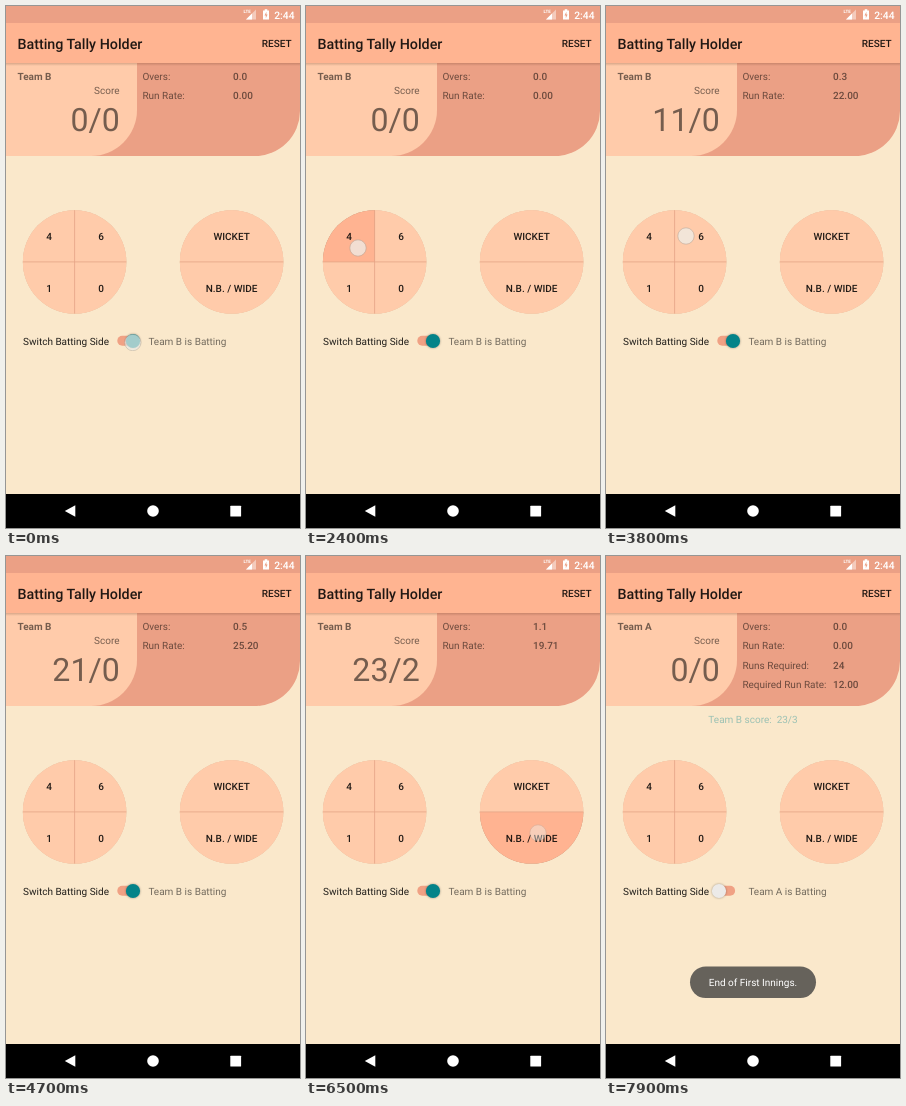
An HTML page that plays this animation: 294 px wide and 522 px high, repeating every 8000 ms.

```html
<!DOCTYPE html>
<html lang="en">
<head>
<meta charset="utf-8">
<title>Batting Tally Holder</title>
<style>
  html, body { margin: 0; width: 100%; height: 100%; overflow: hidden; background: #fae8cb; }
  svg { display: block; width: 294px; height: 522px; }
  text { font: 400 10px Roboto, sans-serif; fill: #000; fill-opacity: .54; text-rendering: geometricPrecision; }
  .medium { font-weight: 500; }
  .bold { font-weight: 700; }
  .dark { fill-opacity: .87; }
  .white { fill: #fff; fill-opacity: 1; }
  .end { text-anchor: end; }
  .mid { text-anchor: middle; }
  .key { fill: #ffcbaa; }
  .key.raised { filter: drop-shadow(0 1px .8px rgba(90, 40, 20, .5)); }
  .key.pressed { fill: #ffb391; filter: drop-shadow(0 .5px .5px rgba(90, 40, 20, .3)); }
  .disc { fill: #ffcbaa; filter: drop-shadow(0 .7px .6px rgba(80, 50, 30, .32)); }
  .seam { stroke: #e5a486; stroke-width: .8; }
</style>
</head>
<body>
<svg viewBox="0 0 294 522">
  <rect width="294" height="522" fill="#fae8cb"/>
  <path d="M0 57H294V105A45 45 0 0 1 249 150H0Z" fill="#eba085"/>
  <path d="M0 57H131V104A46 46 0 0 1 85 150H0Z" fill="#ffcbaa"/>
  <linearGradient id="shade" x2="0" y2="1">
    <stop stop-color="#502814" stop-opacity=".22"/>
    <stop offset="1" stop-color="#502814" stop-opacity="0"/>
  </linearGradient>
  <rect y="57" width="294" height="3" fill="url(#shade)"/>
  <rect y="17" width="294" height="40" fill="#ffb491"/>
  <rect width="294" height="17" fill="#eba085"/>

  <path d="M240 13.5L250 3.5V13.5Z" fill="#fff" opacity=".45"/>
  <path d="M240 13.5L246 7.5V13.5Z" fill="#fff"/>
  <text class="white bold" x="237.5" y="7" style="font-size:4.5px">LTE</text>
  <path d="M257 4.5H258.7V3.3H261.3V4.5H263V13.5H257Z" fill="#fff"/>
  <path d="M260.4 5.8L258.5 9.4H259.8V12.2L261.6 8.4H260.4Z" fill="#eba085"/>
  <text class="white medium end" x="288.5" y="12.7" style="font-size:10.3px">2:44</text>

  <text class="medium dark" x="11.4" y="42.6" style="font-size:14.3px">Batting Tally Holder</text>
  <text class="medium dark end" x="285.5" y="41">RESET</text>

  <text class="bold" id="team" x="11.4" y="74"></text>
  <text class="end" x="113.5" y="88">Score</text>
  <text class="end" id="score" x="113.7" y="125.2" style="font-size:32.1px"></text>
  <g id="stats"></g>
  <text class="mid" id="previous" x="147" y="167" style="fill:#00838f;fill-opacity:.38;white-space:pre">Team B score:  23/3</text>

  <g id="pads"></g>

  <text class="dark" x="17" y="338.6">Switch Batting Side</text>
  <text id="side" x="142.4" y="338.6"></text>
  <rect x="111.3" y="329.8" width="17.8" height="10" rx="5" fill="#f0a184"/>
  <circle id="thumb" cy="335" r="7.1" style="filter:drop-shadow(0 .8px .8px rgba(0,0,0,.35))"/>

  <g id="toast">
    <rect x="84" y="410.5" width="126" height="31.5" rx="15.75" fill="#66625b"/>
    <text class="white mid" x="147" y="430">End of First Innings.</text>
  </g>
  <circle id="touch" r="8.2" fill="#eeefeb" stroke="#a29a90" stroke-width=".6"/>

  <rect y="488" width="294" height="34"/>
  <path d="M58.8 505L69.3 499.2V510.8Z" fill="#fff"/>
  <circle cx="147" cy="505" r="5.8" fill="#fff"/>
  <rect x="224.3" y="499.7" width="10.8" height="10.8" rx=".6" fill="#fff"/>
</svg>
<script>
const LOOP = 8000, STEP = 100;
const $ = id => document.getElementById(id);

function add(parent, tag, attrs, text = '') {
  const el = document.createElementNS('http://www.w3.org/2000/svg', tag);
  for (const name in attrs) el.setAttribute(name, attrs[name]);
  el.textContent = text;
  return parent.appendChild(el);
}

// Scoring pads
const R = 51.7, CY = 255.9, LEFT = 68.6, RIGHT = 225.6;
const quarter = (sx, sy) =>
  `M${LEFT} ${CY}h${sx * R}A${R} ${R} 0 0 ${sx * sy > 0 ? 1 : 0} ${LEFT} ${CY + sy * R}Z`;
const half = sy =>
  `M${RIGHT - R} ${CY}A${R} ${R} 0 0 ${sy < 0 ? 1 : 0} ${RIGHT + R} ${CY}Z`;

const keys = {
  0: { path: quarter(1, 1), x: 95, y: 286 },
  1: { path: quarter(-1, 1), x: 43, y: 286, touch: [45, 279] },
  6: { path: quarter(1, -1), x: 95, y: 234, touch: [80, 230], runs: 6 },
  4: { path: quarter(-1, -1), x: 43, y: 234, touch: [52, 242], runs: 4 },
  'N.B. / WIDE': { path: half(1), x: RIGHT, y: 286, touch: [232, 277] },
  WICKET: { path: half(-1), x: RIGHT, y: 234, touch: [229, 238] }
};
const pads = $('pads');
for (const cx of [LEFT, RIGHT]) add(pads, 'circle', { class: 'disc', cx, cy: CY, r: R });
for (const name of ['0', '1', '6', '4', 'N.B. / WIDE', 'WICKET'])
  keys[name].el = add(pads, 'path', { d: keys[name].path });
add(pads, 'path', {
  class: 'seam',
  d: `M${LEFT} ${CY - R}v${2 * R}M${LEFT - R} ${CY}h${2 * R}M${RIGHT - R} ${CY}h${2 * R}`
});
for (const name in keys)
  add(pads, 'text', { class: 'medium dark mid', x: keys[name].x, y: keys[name].y }, name);

const stats = ['Overs:', 'Run Rate:', 'Runs Required:', 'Required Run Rate:'].map((label, i) => {
  const y = 74 + i * 19.4;
  return [
    add($('stats'), 'text', { x: 136.4, y }, label),
    add($('stats'), 'text', { class: 'medium', x: 227, y })
  ];
});

// key, finger down, highlight, count, settled
const taps = [
  ['4', 2400, 2400, 2500, 2700],
  ['6', 2700, 2800, 2900, 3100],
  ['1', 3300, 3400, 3500, 3700],
  ['6', 3800, 3900, 4000, 4100],
  ['4', 4300, 4400, 4500, 4700],
  ['WICKET', 5200, 5200, 5300, 5500],
  ['WICKET', 5500, 5500, 5600, 5800],
  ['N.B. / WIDE', 6000, 6100, 6200, 6400],
  ['N.B. / WIDE', 6400, 6400, 6500, 6800],
  ['WICKET', 7200, 7300, 7400, 7600]
];

// time, thumb position from 0 (Team A) to 1 (Team B)
const slide = [
  [0, 1], [200, .85], [300, .45], [400, .1], [500, 0],
  [1200, .15], [1300, .55], [1400, .9], [1500, 1],
  [7700, .75], [7800, .2], [7900, 0]
];
// from, to, x, y, opacity
const switchTouches = [
  [0, 100, 126.8, 336.5, .68], [100, 200, 126.8, 336.5, .35],
  [1000, 1200, 115, 335.7, .68], [1200, 1300, 115, 338, .35],
  [7600, 7700, 116, 336, .68], [7700, 7800, 116, 336, .3]
];
const INNINGS_END = 7700;

function showTouch(x, y, opacity) {
  const dot = $('touch');
  dot.setAttribute('cx', x);
  dot.setAttribute('cy', y);
  dot.setAttribute('opacity', opacity);
}

function draw(t) {
  let runs = 0, wickets = 0, balls = 0;
  showTouch(0, 0, 0);
  for (const name in keys) keys[name].el.setAttribute('class', 'key');

  for (const [name, down, press, count, end] of taps) {
    const key = keys[name];
    if (t >= count) {
      if (name === 'WICKET') wickets++;
      else runs += key.runs || 1;
      if (name !== 'N.B. / WIDE') balls++;
    }
    if (t < down || t >= end) continue;
    const released = t >= count + STEP;
    if (t >= press) key.el.setAttribute('class', released ? 'key raised' : 'key pressed');
    if (!released) showTouch(...key.touch, t < count ? .72 : .45);
  }
  for (const [from, to, ...dot] of switchTouches)
    if (t >= from && t < to) showTouch(...dot);

  const second = t >= INNINGS_END;
  if (second) runs = wickets = balls = 0;
  const team = second || (t >= 200 && t < 1200) ? 'Team A' : 'Team B';
  $('team').textContent = team;
  $('side').textContent = team + ' is Batting';
  $('score').textContent = `${runs}/${wickets}`;

  const rate = balls ? runs / balls * 6 : 0;
  const values = [`${Math.floor(balls / 6)}.${balls % 6}`, rate.toFixed(2), '24', '12.00'];
  stats.forEach(([label, value], i) => {
    value.textContent = values[i];
    label.style.display = value.style.display = i < 2 || second ? '' : 'none';
  });
  $('previous').style.display = second ? '' : 'none';

  const pos = slide.filter(([time]) => time <= t).pop()[1];
  const mix = (a, b) => Math.round(a + (b - a) * pos);
  $('thumb').setAttribute('cx', 113 + 14 * pos);
  $('thumb').setAttribute('fill', `rgb(${mix(236, 4)},${mix(234, 131)},${mix(232, 137)})`);
  $('toast').setAttribute('opacity', second ? Math.min(1, (t - INNINGS_END + STEP) / 300) : 0);
}

const start = performance.now();
function frame() {
  const t = (performance.now() - start) % LOOP;
  draw(Math.floor(t / STEP) * STEP);
  requestAnimationFrame(frame);
}
frame();
</script>
</body>
</html>
```
